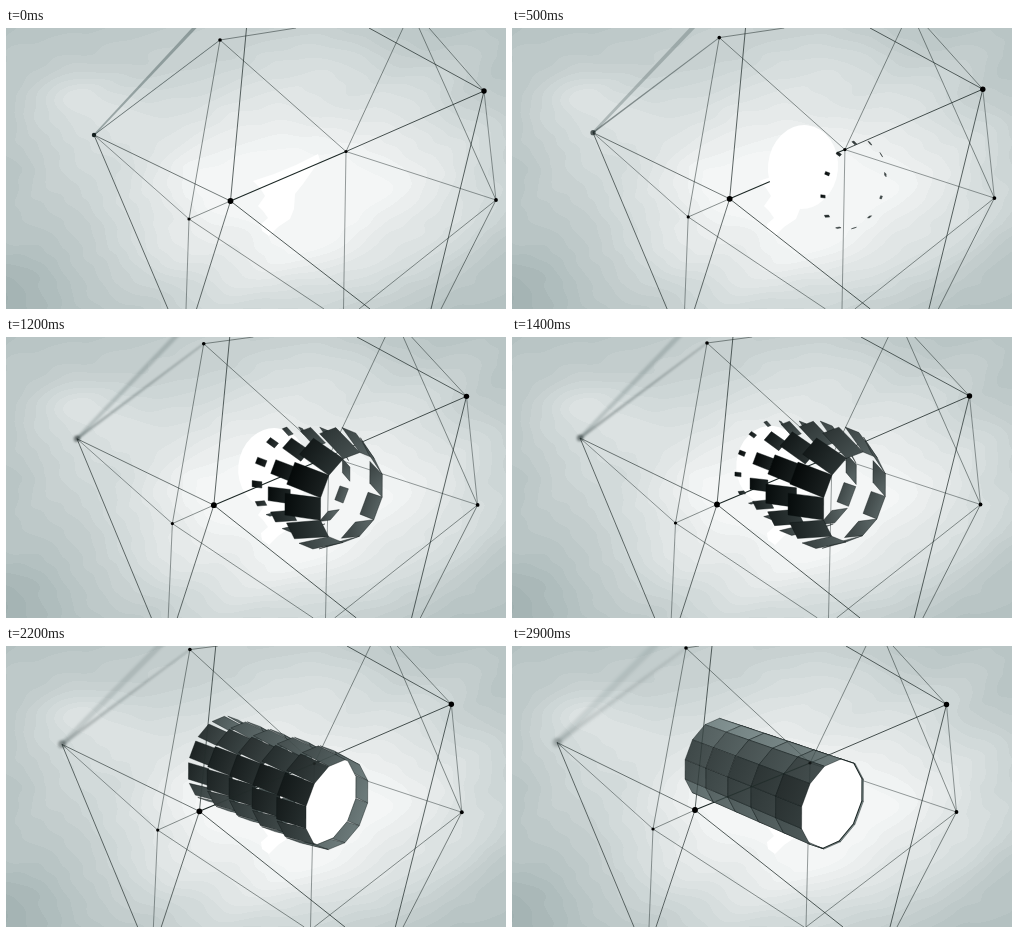
An HTML page with a canvas that plays this animation: 500x281 px, repeating every 3000 ms.

```html
<!DOCTYPE html>
<html lang="en">
<head>
<meta charset="utf-8">
<title>Network and cylinder</title>
<style>
html, body { margin: 0; width: 100%; height: 100%; overflow: hidden; background: #dfe5e5; }
canvas { display: block; width: 100vw; height: 100vh; }
</style>
</head>
<body>
<canvas id="stage" width="500" height="281"></canvas>
<script>
const W = 500, H = 281, LOOP = 3000, STEP = 100;
const ctx = document.getElementById('stage').getContext('2d');
const clamp = x => Math.max(0, Math.min(1, x));
const mix = (a, b, k) => a + (b - a) * k;
const rad = d => d * Math.PI / 180;

// Cloudy backdrop: soft hills of light, cut into flat bands.
function makeBackdrop() {
  const c = document.createElement('canvas');
  c.width = W;
  c.height = H;
  const g = c.getContext('2d');
  const img = g.createImageData(W, H);
  const hill = (x, y, cx, cy, rx, ry) => Math.exp(-(((x - cx) / rx) ** 2) - ((y - cy) / ry) ** 2);
  for (let y = 0, i = 0; y < H; y++) {
    for (let x = 0; x < W; x++, i += 4) {
      let v = 172 + 70 * hill(x, y, 290, 150, 220, 150)
        + 12 * hill(x, y, 290, 215, 130, 75)
        + 10 * hill(x, y, 190, 152, 80, 30)
        + 10 * hill(x, y, 420, 150, 70, 50)
        + 20 * hill(x, y, 65, 75, 70, 65)
        + 6 * hill(x, y, 70, 68, 24, 14)
        + 8 * hill(x, y, 165, 228, 55, 40)
        - 9 * hill(x, y, 400, 258, 60, 35)
        - 12 * hill(x, y, 0, 281, 90, 70)
        - 10 * hill(x, y, 500, 281, 70, 60);
      v += 2.2 * Math.sin(x / 33 + 2 * Math.sin(y / 25 + x / 90))
        + 2 * Math.sin(y / 15 + 1.8 * Math.sin(x / 37) + x / 70)
        + 1.1 * Math.sin(x / 11 + 2 * Math.sin(y / 9)) * Math.sin(y / 13 + x / 29);
      v = Math.min(244, Math.round(v / 5) * 5);
      img.data[i] = v;
      img.data[i + 1] = img.data[i + 2] = v + (255 - v) * 0.17;
      img.data[i + 3] = 255;
    }
  }
  g.putImageData(img, 0, 0);
  g.fillStyle = '#fff';
  g.fill(new Path2D('M247 153L268 146 290 137 312 126 314 132 304 146 297 156 289 166 288 181 284 191 272 199 263 208 256 203 255 196 262 190 257 183 252 178 259 168 254 160Z'));
  return c;
}
const backdrop = makeBackdrop();

// Nodes: position at 0 s, 1.4 s and 2.9 s, then radius.
const NODES = {
  A: [88, 107, 68, 101, 45, 96.5, 2],
  B: [214, 12, 195, 6, 174, 2, 1.8],
  C: [224.5, 173, 205, 167.5, 183, 164, 2.9],
  D: [183, 191, 163.5, 186, 141, 183, 1.6],
  E: [340, 123.5, 320, 119, 298, 117, 1.6],
  F: [478, 63, 457.5, 59, 434.5, 58.5, 2.7],
  G: [490, 172, 468.5, 167.5, 444.5, 166, 1.9]
};
const LINKS = [
  ['A', 'C', .6], ['A', 'D', .45], ['B', 'D', .5], ['B', 'E', .5], ['C', 'D', .5],
  ['C', 'E', 1.1], ['E', 'F', .8], ['E', 'G', .45], ['F', 'G', .45]
];
// Links that leave the stage: node, edge y, x at start, x at end, width.
const EXITS = [
  ['A', H, 162, 122, .65], ['B', 0, 290, 187, .5], ['C', 0, 240.5, 200, .7],
  ['E', 0, 397, 354, .5], ['F', 0, 363, 334, .7], ['F', 0, 423, 381, .5],
  ['G', 0, 413, 375, .5], ['E', H, 337.5, 294, .45], ['F', H, 425, 378, .7],
  ['G', H, 435, 385, .55], ['G', H, 353, 294, .5], ['C', H, 364, 331, .75],
  ['C', H, 190.5, 144, .65], ['D', H, 180, 137, .45], ['D', H, 318, 292, .5]
];

// Parabola through three keyed values.
function through(a, b, c, t) {
  const p = 1.4, q = 2.9;
  return a * (t - p) * (t - q) / (p * q)
    + b * t * (t - q) / (p * (p - q))
    + c * t * (t - p) / (q * (q - p));
}

function place(t) {
  const out = {};
  for (const k in NODES) {
    const n = NODES[k];
    out[k] = [through(n[0], n[2], n[4], t), through(n[1], n[3], n[5], t)];
  }
  return out;
}

function line(a, b, width) {
  ctx.lineWidth = width;
  ctx.beginPath();
  ctx.moveTo(...a);
  ctx.lineTo(...b);
  ctx.stroke();
}

function dot(p, r) {
  ctx.beginPath();
  ctx.arc(p[0], p[1], r, 0, 7);
  ctx.fill();
}

function wedge(a, b, wa, wb) {
  const len = Math.hypot(b[0] - a[0], b[1] - a[1]);
  const nx = (a[1] - b[1]) / len / 2, ny = (b[0] - a[0]) / len / 2;
  ctx.beginPath();
  ctx.moveTo(a[0] + nx * wa, a[1] + ny * wa);
  ctx.lineTo(b[0] + nx * wb, b[1] + ny * wb);
  ctx.lineTo(b[0] - nx * wb, b[1] - ny * wb);
  ctx.lineTo(a[0] - nx * wa, a[1] - ny * wa);
  ctx.fill();
}

function drawNet(pos, t) {
  const k = t / 2.9;
  ctx.strokeStyle = '#1c2826';
  for (const [a, b, w] of LINKS) line(pos[a], pos[b], w);
  for (const [a, y, x0, x1, w] of EXITS) line(pos[a], [mix(x0, x1, k), y], w);
  ctx.fillStyle = '#000';
  for (const n in NODES) if (n !== 'A') dot(pos[n], NODES[n][6]);
}

// The left node drifts out of focus.
function drawSoft(pos, t) {
  const k = t / 2.9, fade = Math.sqrt(k), a = pos.A;
  ctx.save();
  ctx.filter = `blur(${mix(.4, 1.6, k)}px)`;
  ctx.fillStyle = `rgba(80,98,98,${mix(.48, .14, fade)})`;
  wedge(a, [mix(191, 145, k), -3], mix(1.6, 6, k), mix(3.4, 7, k));
  ctx.fillStyle = `rgba(40,55,55,${mix(.75, .15, fade)})`;
  wedge(a, pos.B, mix(.8, 5, k), mix(.7, 1.6, k));
  ctx.fillStyle = `rgba(10,20,20,${mix(.95, .2, fade)})`;
  dot(a, mix(2.2, 4.6, k));
  ctx.restore();
}

// Cylinder: 5 rings of 12 plates, projected with a shrinking ellipse.
const RINGS = 5, AXIS = [-120.5, -46.5], U = [8.5, -45];

function makeTube(pos, t) {
  const front = [pos.E[0] + 22.5, pos.E[1] + 41];
  const V = [30.8, mix(.5, -2.5, clamp((t - .5) / 2.4))];
  const size = z => 1 / (1 + z * .0299);
  const out = d => [0, 1].map(i => U[i] * Math.cos(rad(d)) + V[i] * Math.sin(rad(d)));
  const point = (z, d) => {
    const s = size(z), o = out(d);
    return [0, 1].map(i => front[i] + AXIS[i] * (1 - s) / .13 + o[i] * s);
  };
  return { size, out, point };
}

function trace(path, pts) {
  pts.forEach((p, i) => i ? path.lineTo(...p) : path.moveTo(...p));
  path.closePath();
  return path;
}

const tone = g => `rgb(${g | 0},${(g + 4 + g * .09) | 0},${(g + 4 + g * .09) | 0})`;

// A plate grows about its middle and is hinged at its front edge.
function drawPlate(tube, ring, deg, t, shape) {
  const grow = clamp((t - .4 - ring * .28) / .8);
  if (!grow) return;
  const tilt = rad(27 * clamp((2.5 - t) / 1.1));
  const { point, size, out } = tube;
  const base = [[ring, -15], [ring, 15], [ring + 1, 15], [ring + 1, -15]].map(([z, d]) => point(z, deg + d));
  const near = point(ring, deg), far = point(ring + 1, deg);
  const s = size(ring + .5), o = out(deg);
  const mid = [0, 1].map(i => base.reduce((sum, p) => sum + p[i], 0) / 4);
  const pts = base.map((p, j) => [0, 1].map(i => {
    const swing = (Math.cos(tilt) - 1) * (far[i] - near[i]) + Math.sin(tilt) * 39 * s * o[i] / 45;
    return mid[i] + grow * (p[i] - mid[i] + (j > 1 ? swing : 0));
  }));
  const close = clamp((t - 1.7) / 1.2);
  const turn = 1 - Math.cos(rad(deg + 85));
  const g = Math.min(mix(64, 130, close), mix(4, 38, close) + mix(66, 92, close) * turn + ring * 6 * close);
  const half = (a, b) => [(a[0] + b[0]) / 2, (a[1] + b[1]) / 2];
  const fill = ctx.createLinearGradient(...half(pts[2], pts[3]), ...half(pts[0], pts[1]));
  fill.addColorStop(0, tone(g));
  fill.addColorStop(1, tone(g + mix(22, 8, close)));
  const path = trace(new Path2D(), pts);
  ctx.fillStyle = fill;
  ctx.fill(path);
  ctx.strokeStyle = 'rgba(8,16,16,.65)';
  ctx.lineWidth = .6;
  ctx.stroke(path);
  if (shape) shape.addPath(path);
}

// White disc that slides to the back of the tube.
function drawDisc(t) {
  if (t < .1 || t > 1.7) return;
  const k = clamp((t - .5) / .4), m = clamp((t - .9) / .8);
  const s = clamp(t / .4);
  ctx.fillStyle = '#fff';
  ctx.beginPath();
  ctx.ellipse(mix(mix(291, 281, k), 244, m), mix(mix(139, 136.5, k), 123, m),
    mix(35, 37, k) * s * (1 - .15 * m), 42 * s * (1 - .1 * m), .1, 0, 7);
  ctx.fill();
}

function drawTube(pos, t) {
  const tube = makeTube(pos, t);
  const shape = new Path2D();
  for (let r = RINGS - 1; r >= 0; r--)
    for (let d = 15; d < 180; d += 30) drawPlate(tube, r, d, t);

  // White light filling the mouth, coming forward.
  if (t >= 1.5) {
    const depth = .55 * (1 - clamp((t - 1.9) / .9)) + .05;
    const rim = [];
    for (let d = 0; d < 360; d += 30) rim.push(tube.point(depth, d));
    const cap = trace(new Path2D(), rim);
    ctx.fillStyle = '#fff';
    ctx.fill(cap);
    ctx.strokeStyle = '#1d2827';
    ctx.lineWidth = 1.1 * clamp((t - 1.8) / .8) + .01;
    ctx.stroke(cap);
  }

  for (let r = RINGS - 1; r >= 0; r--)
    for (const d of [-165, -15, -135, -45, -105, -75]) drawPlate(tube, r, d, t, shape);

  const seen = clamp((t - 1.7) / 1.2);
  if (seen) {
    ctx.save();
    ctx.clip(shape);
    ctx.globalAlpha = .6 * seen;
    drawNet(pos, t);
    ctx.restore();
  }
}

function frame() {
  const t = Math.floor(performance.now() % LOOP / STEP) * STEP / 1000;
  const pos = place(t);
  const discBehind = t > .7;
  ctx.drawImage(backdrop, 0, 0);
  if (discBehind) drawDisc(t);
  drawSoft(pos, t);
  drawNet(pos, t);
  if (!discBehind) drawDisc(t);
  drawTube(pos, t);
  requestAnimationFrame(frame);
}
frame();
</script>
</body>
</html>
```
